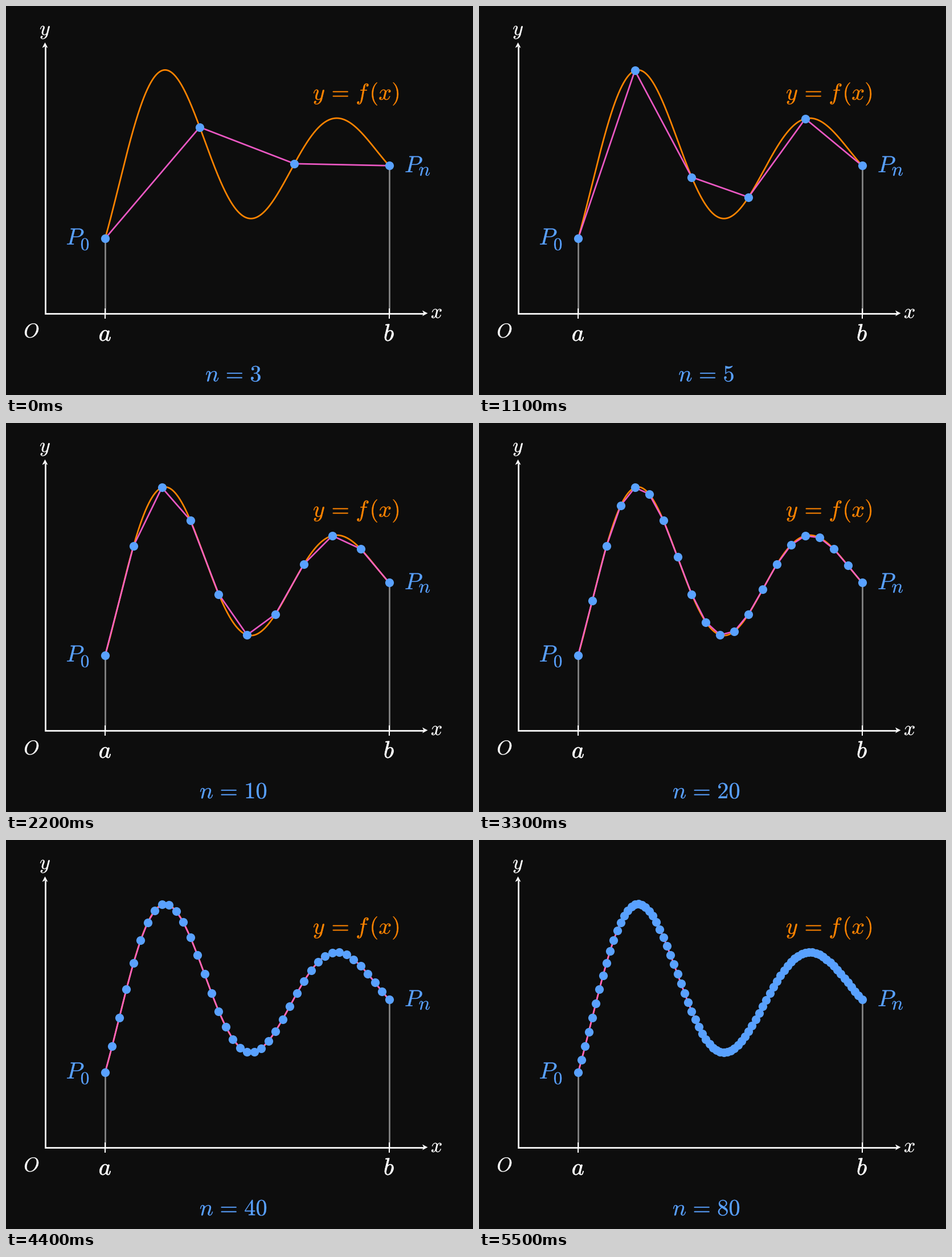
Recreate the animation shown at these times as a matplotlib script. Size 820 px wide and 683 px high, loop 6.6 s.

```python
import numpy as np
import matplotlib.pyplot as plt
from matplotlib.animation import FuncAnimation
from matplotlib.patches import PathPatch, Polygon
from matplotlib.textpath import TextPath
from matplotlib.transforms import Affine2D

W, H, DPI = 820, 683, 64  # a power of two keeps the pixel size exact
PX = 72 / DPI  # points per pixel
BG, WHITE, GRAY = "#0d0d0d", "#ffffff", "#868686"
ORANGE, PINK, BLUE = "#ff8400", "#ff5fd4", "#59a1ff"
COUNTS = [3, 5, 10, 20, 40, 80]
A, B, AXIS_X, AXIS_Y = 174, 672.7, 68.5, 539.5

plt.rcParams["mathtext.fontset"] = "cm"
fig = plt.figure(figsize=(W / DPI, H / DPI), dpi=DPI, facecolor=BG)
ax = fig.add_axes([0, 0, 1, 1])
ax.set_xlim(0, W)
ax.set_ylim(H, 0)
ax.axis("off")


def f(x):
    """Damped wave in stage coordinates."""
    t = x - 279.3
    return 268 - 156.9 * np.exp(-0.0026 * t) * np.cos(np.pi * t / 150.75 - 0.124)


def line(xs, ys, color, width=2.7, **kw):
    kw.setdefault("solid_capstyle", "butt")
    return ax.plot(xs, ys, color=color, lw=width * PX, **kw)[0]


def glyphs(tex, x, base, size, anchor=0):
    """Outline of a formula; anchor 0 puts its left edge at x, 0.5 its middle."""
    path = TextPath((0, 0), f"${tex}$", size=size)
    box = path.get_extents()
    shift = x - box.x0 - anchor * box.width
    return Affine2D().scale(1, -1).translate(shift, base).transform_path(path)


def label(tex, x, base, size, color, weight=0.3, anchor=0):
    patch = PathPatch(glyphs(tex, x, base, size, anchor), fc=color, ec=color,
                      lw=weight * PX, zorder=6)
    return ax.add_patch(patch)


def arrow(x, y, dx, dy):
    """Barbed tip at (x, y) pointing along (dx, dy)."""
    shape = [(0, 0), (-9.5, 5), (-7, 0), (-9.5, -5)]
    pts = [(x + u * dx - v * dy, y + u * dy + v * dx) for u, v in shape]
    ax.add_patch(Polygon(pts, fc=WHITE, ec="none", zorder=3))


def equals(left, right):
    gap = r"\hspace{0.117}"
    return left + gap + "=" + gap + right


# Axes, verticals and ticks
for x in (A, B):
    line([x, x], [f(x), AXIS_Y], GRAY, zorder=1)
    line([x, x], [531, 548.5], WHITE, 2, zorder=3)
line([AXIS_X, AXIS_X, 734], [71, AXIS_Y, AXIS_Y], WHITE,
     solid_joinstyle="miter", zorder=2)
arrow(740.5, AXIS_Y, 1, 0)
arrow(AXIS_X, 64, 0, -1)

# Fixed labels
label("y", 60, 51, 36, WHITE)
label("x", 747, 548, 36, WHITE)
label("O", 33, 582, 35, WHITE)
label("a", A, 588, 42, WHITE, 0.7, 0.5)
label("b", B, 588, 42, WHITE, 0.7, 0.5)
label(equals(r"y\hspace{0.041}", r"f\hspace{0.123}(x)"), 540, 164.5, 40.5, ORANGE)
label("P", 107, 419, 41, BLUE)
label("0", 132, 428.5, 31, BLUE)
label("P", 701.5, 292, 41, BLUE)
label("n", 725.5, 298, 34, BLUE)

# Curve, chords and points
xs = np.linspace(A, B, 500)
line(xs, f(xs), ORANGE, zorder=3)
chords = line([], [], PINK, alpha=0.92, zorder=4, solid_joinstyle="round")
dots = line([], [], BLUE, 0, zorder=5, marker="o", ms=15.2 * PX, mew=0)
count = label("n", 399, 659, 40.5, BLUE, 0.3, 0.5)


def update(i):
    n = COUNTS[i]
    px = np.linspace(A, B, n + 1)
    chords.set_data(px, f(px))
    dots.set_data(px, f(px))
    count.set_path(glyphs(equals("n", str(n)), 399, 659, 40.5, 0.5))
    return chords, dots, count


anim = FuncAnimation(fig, update, frames=len(COUNTS), interval=1100, repeat=True,
                     repeat_delay=0, init_func=lambda: update(0))
plt.show()
```
